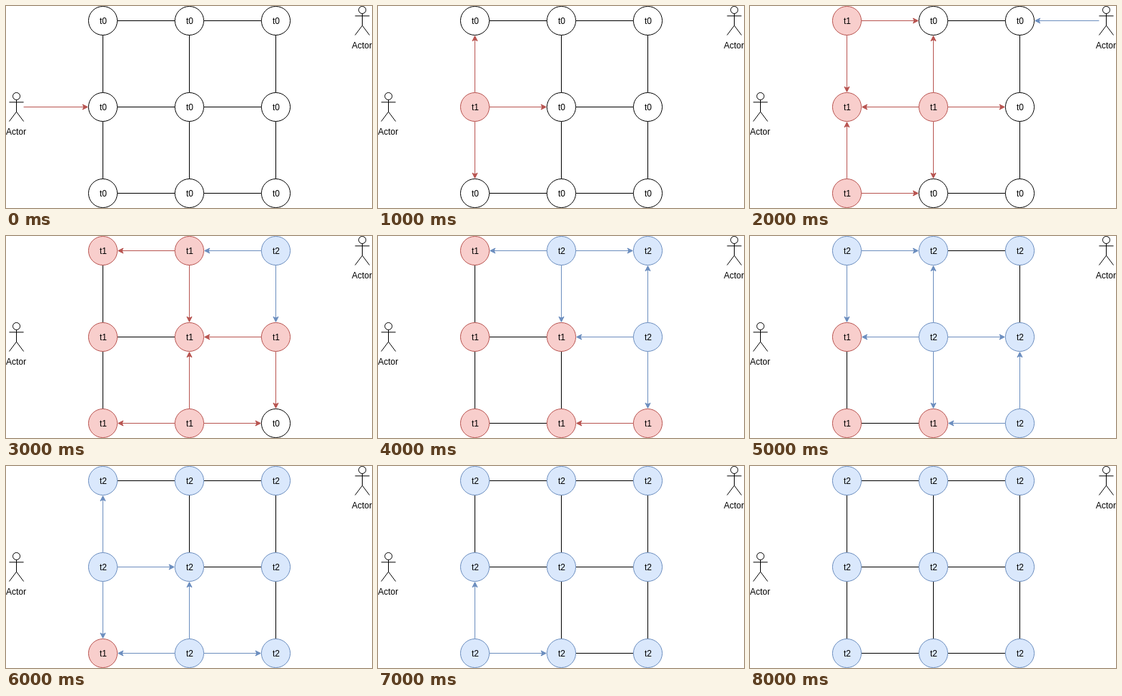
These frames come from a looping animation (508x281 px, 9000 ms). An HTML page with a canvas:

```html
<!DOCTYPE html>
<html lang="en">
<head>
<meta charset="utf-8">
<title>Gossip grid</title>
<style>
  html, body { margin: 0; width: 100%; height: 100%; overflow: hidden; background: #fff; }
  canvas { display: block; width: 508px; height: 281px; }
</style>
</head>
<body>
<canvas id="stage"></canvas>
<script>
const W = 508, H = 281, STEP = 1000, STEPS = 9;
const FILL = ['#ffffff', '#f8cecc', '#dae8fc'];
const LINE = ['#000000', '#b85450', '#6c8ebf'];
const R = 20;

const canvas = document.getElementById('stage');
const ctx = canvas.getContext('2d');
const ratio = window.devicePixelRatio || 1;
canvas.width = Math.round(W * ratio);
canvas.height = Math.round(H * ratio);

// Nodes are numbered row by row in a 3 x 3 grid.
const nodes = Array.from({ length: 9 }, (_, i) => ({
  x: 134.5 + (i % 3) * 120,
  y: 20.5 + Math.floor(i / 3) * 120
}));
const edges = [];
for (let i = 0; i < 9; i++) {
  if (i % 3 < 2) edges.push([i, i + 1]);
  if (i < 6) edges.push([i, i + 3]);
}

// An actor writes a value to a node; it arrives one step later.
const writes = [
  { step: 0, node: 3, value: 1, from: 24.5 },
  { step: 2, node: 2, value: 2, from: 484.5 }
];

// Every step, each node takes the newest value among its neighbours.
function simulate() {
  const states = [{ values: Array(9).fill(0), fresh: Array(9).fill(false) }];
  for (let s = 1; s < STEPS; s++) {
    const old = states[s - 1].values;
    const values = old.slice();
    for (const [a, b] of edges) {
      values[a] = Math.max(values[a], old[b]);
      values[b] = Math.max(values[b], old[a]);
    }
    for (const w of writes) if (w.step === s - 1) values[w.node] = w.value;
    states.push({ values, fresh: values.map((v, i) => v !== old[i]) });
  }
  return states;
}
const states = simulate();

function line(x1, y1, x2, y2) {
  ctx.beginPath();
  ctx.moveTo(x1, y1);
  ctx.lineTo(x2, y2);
  ctx.stroke();
}

function arrow(x1, y1, x2, y2, color) {
  const len = Math.hypot(x2 - x1, y2 - y1);
  ctx.save();
  ctx.translate(x1, y1);
  ctx.rotate(Math.atan2(y2 - y1, x2 - x1));
  ctx.strokeStyle = ctx.fillStyle = color;
  const tip = len - 1.118;
  line(0, 0, tip - 5.25, 0);
  ctx.beginPath();
  ctx.moveTo(tip, 0);
  ctx.lineTo(tip - 7, 3.5);
  ctx.lineTo(tip - 5.25, 0);
  ctx.lineTo(tip - 7, -3.5);
  ctx.closePath();
  ctx.fill();
  ctx.stroke();
  ctx.restore();
}

function label(text, x, y) {
  ctx.fillStyle = '#000';
  ctx.fillText(text, x, y);
}

function actor(x, y) {
  ctx.strokeStyle = '#000';
  ctx.beginPath();
  ctx.arc(x, y + 5, 5, 0, Math.PI * 2);
  ctx.moveTo(x, y + 10);
  ctx.lineTo(x, y + 80 / 3);
  ctx.moveTo(x - 10, y + 40 / 3);
  ctx.lineTo(x + 10, y + 40 / 3);
  ctx.moveTo(x - 10, y + 40);
  ctx.lineTo(x, y + 80 / 3);
  ctx.lineTo(x + 10, y + 40);
  ctx.stroke();
  label('Actor', x - 0.5, y + 58.5);
}

function edge(a, b, { values, fresh }) {
  // The newer value wins when both ends want to send.
  const sends = (p, q) => fresh[p] && !(fresh[q] && values[q] > values[p]);
  if (!sends(a, b) && sends(b, a)) [a, b] = [b, a];
  const p = nodes[a], q = nodes[b];
  const dx = Math.sign(q.x - p.x) * R, dy = Math.sign(q.y - p.y) * R;
  const ends = [p.x + dx, p.y + dy, q.x - dx, q.y - dy];
  if (sends(a, b)) {
    arrow(...ends, LINE[values[a]]);
  } else {
    ctx.strokeStyle = '#000';
    line(...ends);
  }
}

function node({ x, y }, value) {
  ctx.fillStyle = FILL[value];
  ctx.strokeStyle = LINE[value];
  ctx.beginPath();
  ctx.arc(x, y, R, 0, Math.PI * 2);
  ctx.fill();
  ctx.stroke();
  label('t' + value, x + 0.5, y + 4.5);
}

function draw(step) {
  const state = states[step];
  ctx.setTransform(canvas.width / W, 0, 0, canvas.height / H, 0, 0);
  ctx.fillStyle = '#fff';
  ctx.fillRect(0, 0, W, H);
  ctx.lineWidth = 1;
  ctx.miterLimit = 10;
  ctx.font = '12px "Liberation Sans", Arial, sans-serif';
  ctx.textAlign = 'center';
  ctx.textBaseline = 'alphabetic';

  for (const [a, b] of edges) edge(a, b, state);
  for (const w of writes) {
    if (w.step !== step) continue;
    const { x, y } = nodes[w.node];
    arrow(w.from, y, x + Math.sign(w.from - x) * R, y, LINE[w.value]);
  }
  nodes.forEach((n, i) => node(n, state.values[i]));
  actor(14.5, 120.5);
  actor(494.5, 0.5);
}

const start = performance.now();
let shown = -1;
function tick() {
  const step = Math.floor((performance.now() - start) / STEP) % STEPS;
  if (step !== shown) draw(shown = step);
  requestAnimationFrame(tick);
}
tick();
</script>
</body>
</html>
```
